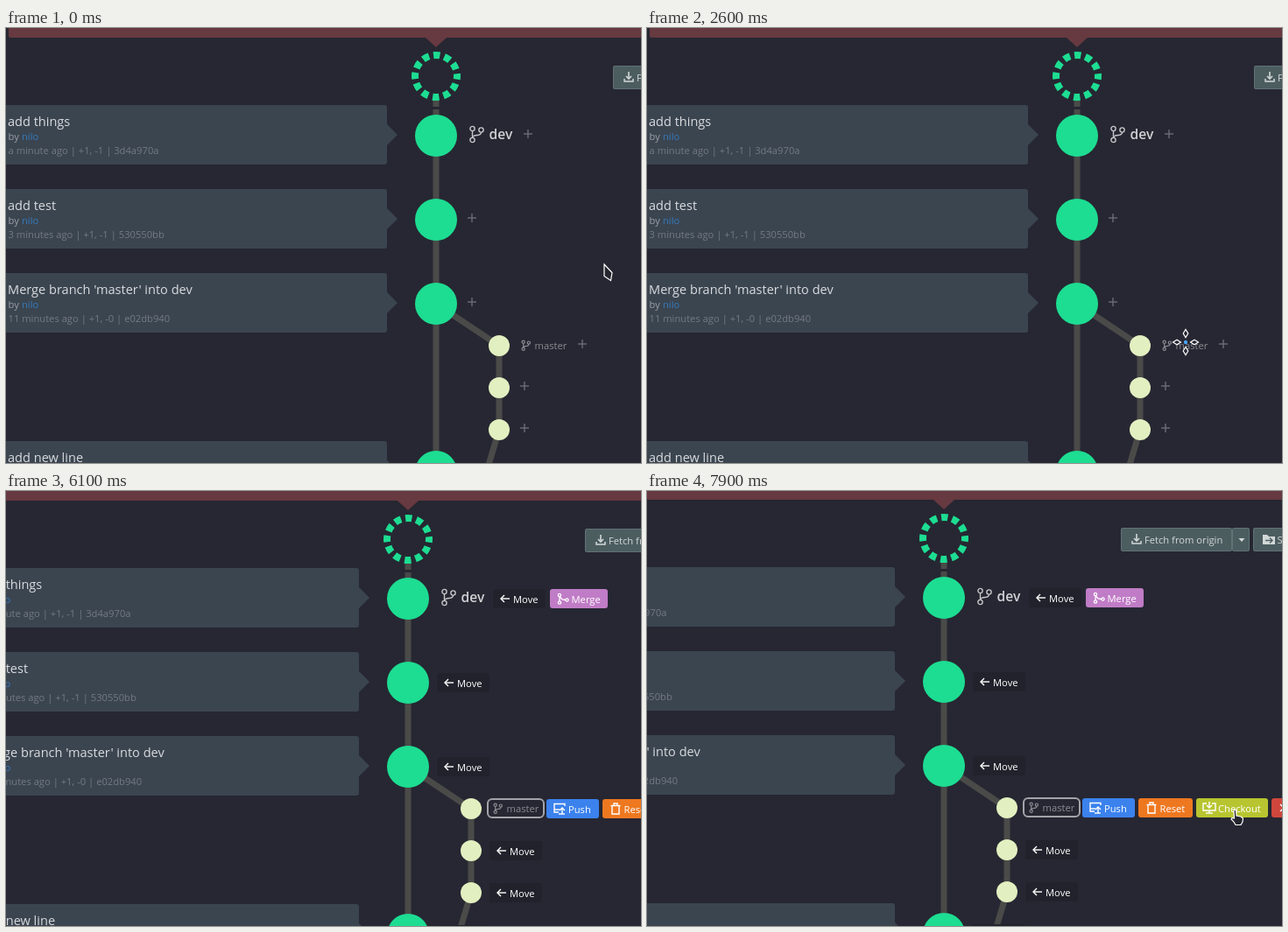
An HTML page with a canvas for the animation above (8000 ms loop, 725 px wide and 497 px high).

```html
<!DOCTYPE html>
<html lang="en">
<head>
<meta charset="utf-8">
<title>Branch graph</title>
<style>
html, body { margin: 0; width: 100%; height: 100%; overflow: hidden; background: #262732; }
canvas { display: block; width: 725px; height: 497px; }
</style>
</head>
<body>
<canvas id="stage"></canvas>
<script>
const W = 725, H = 497, LOOP = 8000, STEP = 100;
const BG = '#262732', GREEN = '#1ddd92', PALE = '#e2efc0', LINE = '#4a4a49', PANEL = '#3b4550';
const FONT = '"Open Sans", "Noto Sans", sans-serif';
const AUTHOR = 'nilo';

const canvas = document.getElementById('stage');
const g = canvas.getContext('2d');
const dpr = window.devicePixelRatio || 1;
canvas.width = W * dpr;
canvas.height = H * dpr;

const commits = [
  [123, 'add things', 'a minute ago | +1, -1 | 3d4a970a'],
  [219, 'add test', '3 minutes ago | +1, -1 | 530550bb'],
  [315, "Merge branch 'master' into dev", '11 minutes ago | +1, -0 | e02db940'],
  [507, 'add new line', '29 minutes ago | +1, -0 | b00308cd'],
  [603, 'bug fixed ! (line 1)', '32 minutes ago | +1, -0 | 9a41c7e2']
];

// keys: [time, ...values]
const scroll = [[400, 0], [500, -18], [600, -62], [700, -102], [800, -126], [900, -122],
  [1000, -88], [1100, -44], [1200, -12], [1300, 0]];
const pan = [[5900, 0, 0], [6000, -8, 0], [6200, -56, -1], [6500, -126, -2], [6600, -138, -2],
  [6800, -148, -2], [7200, -152, -1]];
const pointer = [[1200, 683, 270], [1300, 682, 264], [1400, 672, 254], [1500, 667, 248],
  [1700, 667, 248], [2100, 638, 310], [2400, 609, 356], [2700, 609, 356], [3100, 560, 420],
  [3500, 552, 440], [4000, 580, 435], [4200, 600, 425], [4400, 610, 425], [4700, 640, 445],
  [5100, 740, 460], [7300, 740, 460], [7600, 700, 410], [7900, 671, 364]];

function at(keys, t) {
  if (t <= keys[0][0]) return keys[0].slice(1);
  for (let i = 1; i < keys.length; i++) {
    const a = keys[i - 1], b = keys[i];
    if (t <= b[0]) {
      const k = (t - a[0]) / (b[0] - a[0]);
      return a.slice(1).map((v, j) => Math.round(v + (b[j + 1] - v) * k));
    }
  }
  return keys[keys.length - 1].slice(1);
}

function text(s, x, y, color, size = 11.2, weight = 400) {
  g.font = `${weight} ${size}px ${FONT}`;
  g.fillStyle = color;
  g.fillText(s, x, y);
}

function line(points, color, width = 1.4) {
  g.beginPath();
  points.forEach(([x, y]) => g.lineTo(x, y));
  g.strokeStyle = color;
  g.lineWidth = width;
  g.stroke();
}

function poly(points, fill, stroke) {
  g.beginPath();
  points.forEach(([x, y]) => g.lineTo(x, y));
  g.closePath();
  g.fillStyle = fill;
  g.fill();
  if (stroke) {
    g.strokeStyle = stroke;
    g.lineWidth = 1.2;
    g.stroke();
  }
}

function disc(x, y, r, color) {
  g.beginPath();
  g.arc(x, y, r, 0, 7);
  g.fillStyle = color;
  g.fill();
}

function ring(x, y, r, color, width = 1.4) {
  g.beginPath();
  g.arc(x, y, r, 0, 7);
  g.strokeStyle = color;
  g.lineWidth = width;
  g.stroke();
}

function box(x, y, w, h, r, fill) {
  g.beginPath();
  g.roundRect(x, y, w, h, r);
  g.fillStyle = fill;
  g.fill();
}

function frame(x, y, w, h, r, color, width) {
  g.beginPath();
  g.roundRect(x, y, w, h, r);
  g.strokeStyle = color;
  g.lineWidth = width;
  g.stroke();
}

function local(x, y, scale, draw) {
  g.save();
  g.translate(x, y);
  g.scale(scale, scale);
  draw();
  g.restore();
}

function branchIcon(x, y, scale, color) {
  local(x, y, scale, () => {
    const w = scale < 1 ? 1.9 : 1.4;
    ring(3.5, 3.5, 2.6, color, w);
    ring(3.5, 16.5, 2.6, color, w);
    ring(13.5, 5, 2.6, color, w);
    line([[3.5, 6], [3.5, 14]], color, w);
    g.beginPath();
    g.moveTo(13.5, 7.6);
    g.quadraticCurveTo(13.5, 11, 9, 11);
    g.quadraticCurveTo(4, 11, 3.5, 14);
    g.stroke();
  });
}

const icons = {
  back() {
    line([[5, 0], [-5, 0]], '#fff');
    line([[-1, -4], [-5, 0], [-1, 4]], '#fff');
  },
  merge() {
    ring(-4, -4, 1.6, '#fff', 1.3);
    ring(-4, 4.5, 1.6, '#fff', 1.3);
    ring(4.5, 1.5, 1.6, '#fff', 1.3);
    line([[-4, -2.4], [-4, 2.9]], '#fff', 1.3);
    line([[-3.5, -2], [-1, 1], [3, 1.5]], '#fff', 1.3);
  },
  push() {
    line([[1, -5.5], [-6, -5.5], [-6, 4], [-1, 4]], '#fff');
    line([[1, -5.5], [6, -5.5], [6, -3]], '#fff');
    line([[-6, 1], [0, 1]], '#fff');
    line([[3, 6], [3, -1]], '#fff');
    line([[0, 2], [3, -1], [6, 2]], '#fff');
    line([[-1, 6], [6, 6]], '#fff');
  },
  trash() {
    line([[-5.5, -3.5], [5.5, -3.5]], '#fff');
    line([[-2, -4], [-2, -6], [2, -6], [2, -4]], '#fff');
    line([[-4, -3], [-4, 6], [4, 6], [4, -3]], '#fff');
  },
  screen() {
    line([[-3, -5], [-7, -5], [-7, 3], [7, 3], [7, -5], [3, -5]], '#fff');
    line([[0, -7], [0, 0]], '#fff');
    line([[-3, -3], [0, 0], [3, -3]], '#fff');
    line([[0, 3], [0, 6]], '#fff');
    line([[-4, 6], [4, 6]], '#fff');
  },
  cross() {
    line([[-4, -4], [4, 4]], '#fff');
    line([[4, -4], [-4, 4]], '#fff');
  }
};

function button(x, y, w, label, icon, color, iconX, textX) {
  box(x, y - 11, w, 22, 3, color);
  local(x + iconX, y, 1, icons[icon]);
  text(label, x + textX, y + 5, '#fff');
}

const moveButton = (x, y) => button(x, y, 60, 'Move', 'back', '#21222b', 14, 23);

function plus(x, y) {
  line([[x - 5, y], [x + 5, y]], '#70727a', 1.3);
  line([[x, y - 5], [x, y + 5]], '#70727a', 1.3);
}

function panel([y, title, meta]) {
  box(-20, y - 35, 455, 68, 3, PANEL);
  poly([[434, y - 13], [435, y - 13], [447, y - 1], [435, y + 11], [434, y + 11]], PANEL);
  text(title, 2, y - 11, '#d9dbde', 14.56);
  text('by', 2.5, y + 5, '#9a9fa6');
  text(AUTHOR, 18, y + 5, '#3579bd');
  text(meta, 2.5, y + 21, '#737a83');
}

function graph() {
  line([[491, 83], [491, 90]], LINE, 7);
  line([[491, 93], [491, 100]], LINE, 7);
  line([[491, 123], [491, 740]], LINE, 7);
  line([[491, 315], [563, 363], [563, 459], [491, 699]], LINE, 7);
  commits.forEach(([y]) => disc(491, y, 24, GREEN));
  [363, 411, 459].forEach(y => disc(563, y, 12, PALE));
  const dash = 2 * Math.PI * 24 / 12;
  g.setLineDash([dash * .6, dash * .4]);
  g.lineDashOffset = dash * .3;
  ring(491, 55, 24, GREEN, 8);
  g.setLineDash([]);
}

function toolbar() {
  const fill = '#4c5d60', edge = '#627276', ink = '#d2d7d7';
  [[693, 127], [820, 20], [844, 110]].forEach(([x, w]) => {
    box(x, 43, w, 27, 2, fill);
    frame(x + .5, 43.5, w - 1, 26, 2, edge, 1);
  });
  line([[711, 50], [711, 58]], ink, 1.6);
  line([[708, 55], [711, 58], [714, 55]], ink, 1.6);
  line([[706, 58], [706, 61], [716, 61], [716, 58]], ink, 1.5);
  text('Fetch from origin', 720, 61, ink);
  poly([[827.5, 55], [834.5, 55], [831, 59]], ink);
  poly([[855, 51], [860, 51], [862, 53], [869, 53], [869, 62], [855, 62]], ink);
  line([[858, 57.5], [866, 57.5]], fill, 1.4);
  line([[863, 54.5], [866, 57.5], [863, 60.5]], fill, 1.4);
  text('Stash', 871.5, 61, ink);
}

function labels(open) {
  branchIcon(529, 111.5, 1, '#c5c6c9');
  text('dev', 551.5, 127, '#d0d1d4', 15.6, 600);
  branchIcon(588.5, 356.5, .62, '#8b8d93');
  text('master', 603.5, 367, '#8b8d93');

  const blue = '#2f70b5';
  ring(534, 601, 5.5, blue);
  line([[528.5, 601], [539.5, 601]], blue, 1);
  line([[534, 595.5], [534, 606.5]], blue, 1);
  text('Manager', 544.5, 607, blue, 15.6, 600);
  plus(632, 601);

  g.globalAlpha = 1 - open;
  [[596, 121], [532, 217], [532, 313], [658, 361], [592, 409], [592, 457], [532, 505]]
    .forEach(p => plus(...p));
  g.globalAlpha = open;
  frame(582, 352, 64, 21, 5, '#a2a4aa', 2);
  [[588, 123], [524, 219], [524, 315], [584, 411], [584, 459], [524, 507]]
    .forEach(p => moveButton(...p));
  button(653, 123, 66, 'Merge', 'merge', '#c07cc6', 15, 24.5);
  button(649, 363, 60, 'Push', 'push', '#3b82ed', 15, 25);
  button(713, 363, 62, 'Reset', 'trash', '#ee7820', 15, 24.5);
  button(779, 363, 82, 'Checkout', 'screen', '#b8c530', 15, 25);
  button(865, 363, 70, 'Delete', 'cross', '#cf473c', 14, 25);
  g.globalAlpha = 1;
}

function cursor(t) {
  const [x, y] = at(pointer, t);
  local(x, y, 1, () => {
    if (t >= 2600 && t < 2800) {
      g.translate(6, 0);
      [[0, -7], [0, 13], [-10, 3], [10, 3]].forEach(([a, b]) => {
        const u = a ? 4.5 : 2.8, v = a ? 2.8 : 4.5;
        poly([[a - u, b], [a, b - v], [a + u, b], [a, b + v]], BG, '#fff');
      });
      disc(0, 3, 2.2, '#4aa3f0');
    } else if (t >= 7700) {
      poly([[-1, 1], [0, 0], [1.5, 1], [2, 7], [7, 8], [9.5, 10], [9, 14], [7, 17.5],
        [1, 17.5], [-1, 14], [-4, 11], [-3, 9.5], [-.5, 10]], '#23242c', '#fff');
    } else {
      poly([[0, 0], [9, 9.5], [7.5, 18.5], [0, 13.5]], '#24252e', '#fff');
    }
  });
}

function draw(t) {
  const [px, py] = at(pan, t);
  const [sy] = at(scroll, t);
  const open = Math.min(1, Math.max(0, (t - 2700) / 300));
  g.setTransform(dpr, 0, 0, dpr, 0, 0);
  g.fillStyle = BG;
  g.fillRect(0, 0, W, H);
  g.save();
  g.translate(px, py + sy);
  box(3, -60, 1100, 71, 2, '#673940');
  poly([[479, 11], [503, 11], [491, 22]], '#673940');
  commits.forEach(panel);
  graph();
  toolbar();
  labels(open);
  g.restore();
  cursor(t);
}

const start = performance.now();
function tick() {
  const t = (performance.now() - start) % LOOP;
  draw(Math.floor(t / STEP) * STEP);
  requestAnimationFrame(tick);
}
tick();
</script>
</body>
</html>
```
